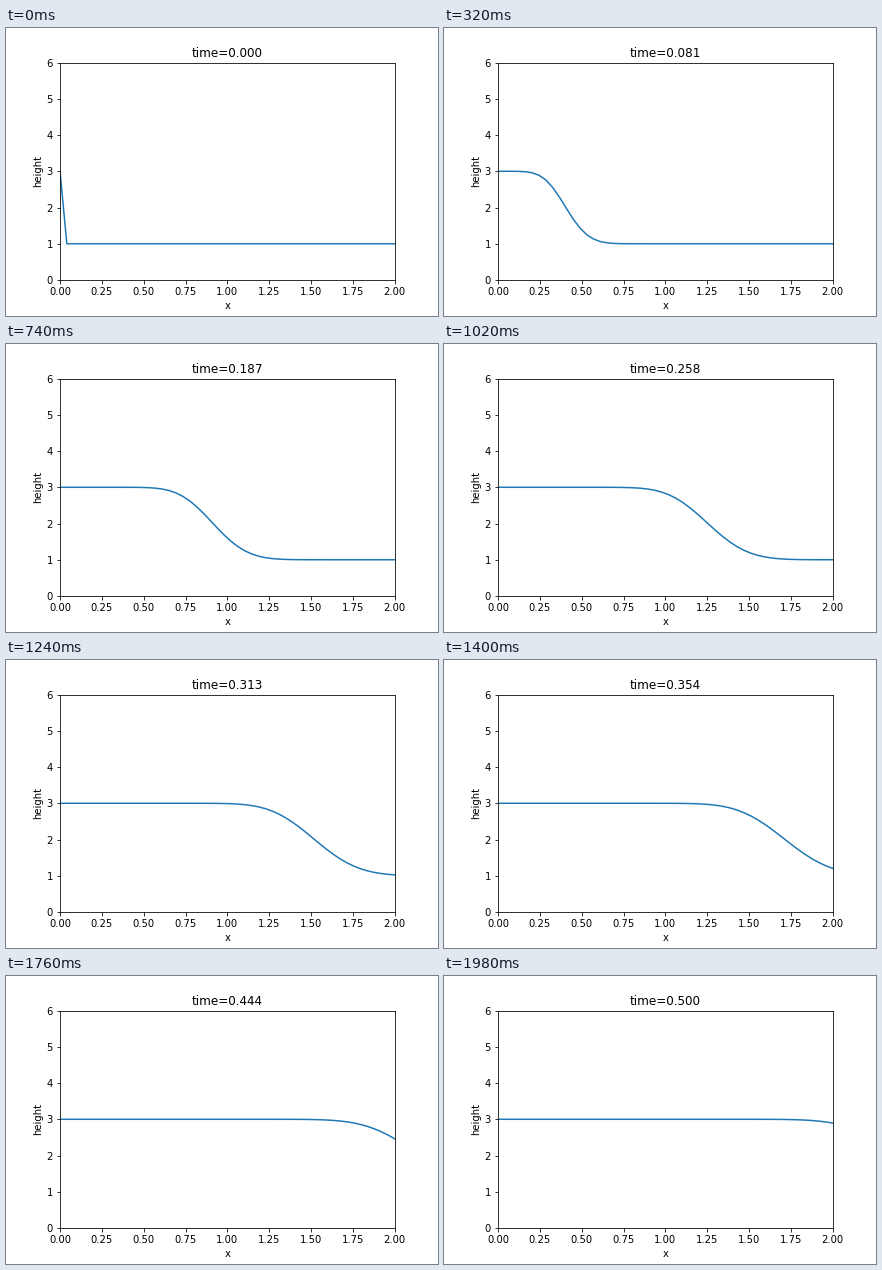
A matplotlib script that plays this animation: 432 px wide and 288 px high, repeating every 2000 ms.

```python
import numpy as np
import matplotlib.pyplot as plt
from matplotlib.animation import FuncAnimation

FRAMES, SUBSTEPS = 100, 2
T_END, LENGTH, NX = 0.5, 2.0, 50
SPEED = 4.8

x = np.linspace(0, LENGTH, NX)
times = np.linspace(0, T_END, FRAMES)
courant = SPEED * times[1] / SUBSTEPS / x[1]


def solve():
    """First-order upwind advection of a step entering from the left."""
    h = np.ones(NX)
    h[0] = 3
    states = [h.copy()]
    for _ in times[1:]:
        for _ in range(SUBSTEPS):
            h[1:] -= courant * np.diff(h)
        states.append(h.copy())
    return states


heights = solve()

plt.rcParams["font.family"] = "DejaVu Sans"
fig, ax = plt.subplots(figsize=(6, 4), dpi=72)
fig.subplots_adjust(left=0.125, right=0.9, bottom=0.125, top=0.88)
ax.set(xlim=(0, LENGTH), ylim=(0, 6), xlabel="x", ylabel="height")
line, = ax.plot(x, heights[0])
title = ax.set_title("")


def update(i):
    line.set_ydata(heights[i])
    title.set_text(f"time={times[i]:.3f}")
    return line, title


anim = FuncAnimation(fig, update, frames=FRAMES, interval=20, repeat=True, repeat_delay=0)
plt.show()
```
